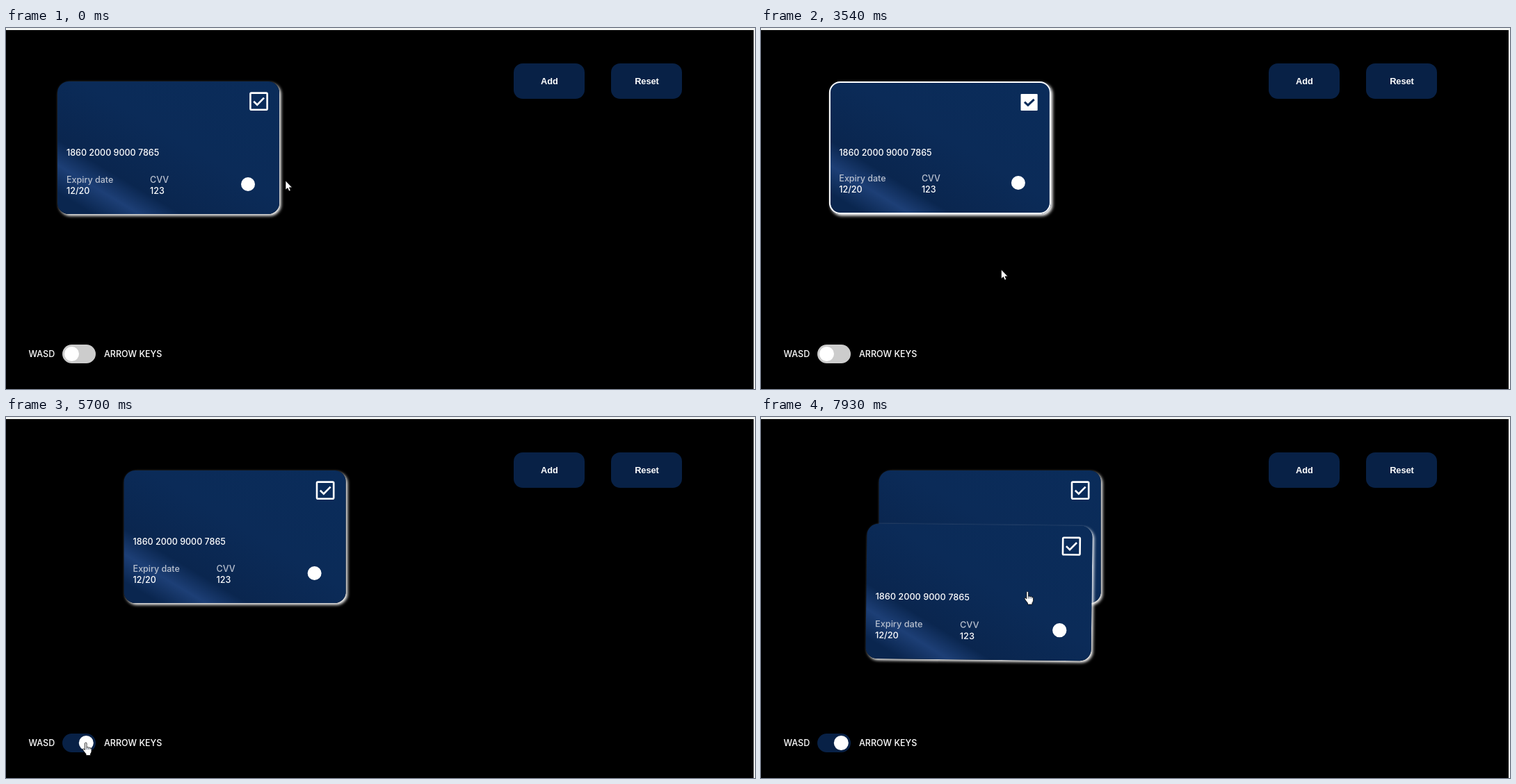
Recreate the animation shown at these times as an HTML page. Size 1077 by 520 pixels, loop 8 s.

```html
<!DOCTYPE html>
<html lang="en">
<head>
<meta charset="utf-8">
<title>Cards</title>
<style>
  html, body { margin: 0; width: 100%; height: 100%; overflow: hidden; background: #000; }
  #stage { position: absolute; left: 0; top: 0; width: 1077px; height: 520px; overflow: hidden;
    background: #000; color: #fff; font: 500 12.5px/16px Inter, sans-serif; }
  #stage div, #stage span, #stage svg { position: absolute; white-space: nowrap; }
  .edge { background: #f3f5f4; }
  .btn { top: 51px; width: 102px; height: 51px; border-radius: 13px; background: #082146;
    font: bold 12.75px/51px "Liberation Sans", Arial, sans-serif; text-align: center; text-indent: 1px; }
  .card { left: 0; top: 0; width: 318.6px; height: 191px; border-radius: 16px;
    box-shadow: 2.4px 2.4px 4px #fff;
    background: linear-gradient(31deg, #0a264f 8%, #1d3f76 18.5%, #0a264f 28%, #0b2b58 55%, #0a2c5a); }
  .card .rim { inset: 0; border-radius: 16px; border: 2.4px solid #fff; display: none; }
  .card.on .rim, .card.on .full { display: block; }
  .card.on .open, .card .full { display: none; }
  .card .dim { color: #b9c1cf; }
  .card .mark { width: 20px; height: 20px; border-radius: 50%; background: #fff; }
  .card .box { left: 0; top: 0; overflow: visible; }
  #track { left: 81px; top: 456px; width: 48px; height: 27px; border-radius: 14px; }
  #knob { left: 3.2px; top: 3.1px; width: 20.8px; height: 20.8px; border-radius: 50%; background: #fff; }
  #press { left: -10px; top: -10px; width: 20px; height: 20px; border-radius: 50%; background: rgba(255, 240, 0, .53); }
  .cursor { left: 0; top: 0; overflow: visible; }
  #hand { left: -4.7px; }
</style>
</head>
<body>
<div id="stage">
  <div class="edge" style="left:0;top:0;width:1077px;height:3px"></div>
  <div class="edge" style="left:1075px;top:0;width:2px;height:520px"></div>
  <div class="btn" id="add" style="left:730px">Add</div>
  <div class="btn" style="left:870px">Reset</div>
  <span style="left:32.5px;top:461.7px">WASD</span>
  <div id="track"><div id="knob"></div></div>
  <span style="left:141px;top:461.7px">ARROW KEYS</span>
  <div id="cards"></div>
  <div id="press"></div>
  <svg class="cursor" id="arrow" width="12" height="18">
    <path d="M0 0V13L3 10.5L5 15L7.2 14L5.3 9.8H9.4Z" fill="#fff" stroke="#000" stroke-width=".6"/>
  </svg>
  <svg class="cursor" id="hand" width="14" height="21">
    <path d="M3.4 2Q4.7-.6 6 2V8Q7.5 6.8 8.4 8.2Q10 7.2 10.8 8.8Q13 8.2 13 10.5V14Q12.5 16.5 11.5 17V19.5H5V17.5Q2.5 14.5 .6 11.5Q0 9.5 2 10L3.4 11.5Z" fill="#fff" stroke="#000" stroke-width=".8"/>
    <path d="M6 8v3M8.4 8.5v2.5M10.8 9v2" fill="none" stroke="#0a1c38" stroke-width=".7"/>
  </svg>
</div>
<script>
const LOOP = 8000, STEP = 23.9, CARD_W = 318.6, CARD_H = 191;
const KEY_TIMES = [3340, 3790, 4110, 4420];
const PICK = 810, TOGGLE = 5310, REPICK = 6080, ADD = 6790, HOLD = 150;

const $ = id => document.getElementById(id);
const within = (v, a, b) => v >= a && v < b;
const mix = (a, b, k) => a + (b - a) * k;
const clamp = v => Math.min(1, Math.max(0, v));
const smooth = u => u * u * (3 - 2 * u);
const blend = (a, b, k) => `rgb(${a.map((v, i) => Math.round(mix(v, b[i], k)))})`;
const show = (el, on) => { el.style.display = on ? "" : "none"; };
const place = (el, x, y, more = "") => { el.style.transform = `translate(${x}px,${y}px)${more}`; };

// CSS "ease": cubic-bezier(.25, .1, .25, 1)
function ease(x) {
  const bez = (a, b, s) => 3 * a * s * (1 - s) ** 2 + 3 * b * s * s * (1 - s) + s ** 3;
  let lo = 0, hi = 1;
  for (let i = 0; i < 20; i++) {
    const mid = (lo + hi) / 2;
    if (bez(.25, .25, mid) < x) lo = mid; else hi = mid;
  }
  return bez(.1, 1, lo);
}
const run = (t, start, dur = 200) => ease(clamp((t - start) / dur));

// Each glide bends downwards by `bow` on its way to x, y.
const glides = [
  { at: 60, dur: 220, x: 320, y: 196 },
  { at: 420, dur: 160, x: 299, y: 187 },
  { at: 3050, dur: 10, x: 297, y: 209 },
  { at: 3060, dur: 340, x: 345.5, y: 348 },
  { at: 4290, dur: 700, x: 110, y: 466 },
  { at: TOGGLE, dur: 90, x: 115, y: 468 },
  { at: 5710, dur: 220, x: 93, y: 441 },
  { at: 6075, dur: 705, x: 796, y: 83, bow: 50 },
  { at: 7160, dur: 1000, x: 320, y: 220, bow: 120 }
];
function pointer(t) {
  let x = 402, y = 220;
  for (const g of glides) {
    const k = smooth(clamp((t - g.at) / g.dur));
    x = mix(x, g.x, k);
    y = mix(y, g.y, k) + (g.bow || 0) * Math.sin(Math.PI * k);
  }
  return [x, y];
}

function makeCard() {
  const el = document.createElement("div");
  el.className = "card";
  el.innerHTML = `<div class="rim"></div>
    <svg class="box open" width="318" height="60" fill="none" stroke="#fff" stroke-width="2.6">
      <rect x="277.4" y="16.6" width="24.2" height="24.2" rx="1.5"/>
      <path d="M282.2 28.8L287.2 33.6L297 23.6"/></svg>
    <svg class="box full" width="318" height="60" fill="none" stroke="#0a2c5a" stroke-width="3">
      <rect x="275.6" y="18" width="24.2" height="24" rx="1" fill="#fff" stroke="none"/>
      <path d="M281 29.6L286 34.2L294.8 25.8"/></svg>`;
  const parts = [];
  const put = (text, x, y, cls = "") => {
    const s = document.createElement("span");
    s.textContent = text;
    s.className = cls;
    el.append(s);
    parts.push({ s, x, y });
  };
  put("1860 2000 9000 7865", 13, 94.7);
  put("Expiry date", 13, 133.7, "dim");
  put("12/20", 13, 149.7);
  put("CVV", 133, 133.7, "dim");
  put("123", 133, 149.7);
  put("", 264, 137.5, "mark");
  $("cards").append(el);
  return {
    el,
    set(x, y, hover, on) {
      el.classList.toggle("on", on);
      place(el, x, y, ` rotate(${2 * hover}deg) scale(${1 + .05 * hover})`);
      // the border squeezes the row of details inwards
      for (const p of parts) {
        p.s.style.left = p.x + (on ? (133 - p.x) * .012 : 0) + "px";
        p.s.style.top = p.y - (on && p.y > 100 ? 1.6 : 0) + "px";
      }
    }
  };
}
const first = makeCard(), second = makeCard();

function draw(t) {
  const left = KEY_TIMES.reduce((x, k) => x + STEP * run(t, k), 74);
  const added = t >= ADD + HOLD;
  const picked = within(t, PICK + 70, TOGGLE + 90) || within(t, REPICK, ADD + HOLD);
  first.set(left, 77, run(t, 70, 220) - run(t, 3180, 220), picked);
  second.set(154, 157, run(t, 7880, 240), false);
  show(second.el, added);

  const flip = run(t, TOGGLE + 30, 320);
  $("track").style.background = blend([204, 204, 204], [8, 33, 70], flip);
  place($("knob"), 20.8 * flip, 0);

  const [x, y] = pointer(t);
  const over = (l, top, w, h) => within(x, l, l + w) && within(y, top, top + h);
  const hand = over(left, 77, CARD_W, CARD_H) || over(81, 456, 48, 27) || over(730, 51, 102, 51) ||
    (added && over(154, 157, CARD_W, CARD_H));
  $("add").style.background = blend([8, 33, 70], [11, 45, 91], run(t, 6600) - run(t, 7300));

  show($("hand"), hand);
  show($("arrow"), !hand);
  show($("press"), [PICK, TOGGLE, ADD].some(at => within(t, at, at + HOLD)));
  for (const id of ["hand", "arrow", "press"]) place($(id), x, y);
}

const start = performance.now();
function tick() {
  draw((performance.now() - start) % LOOP);
  requestAnimationFrame(tick);
}
tick();
</script>
</body>
</html>
```
